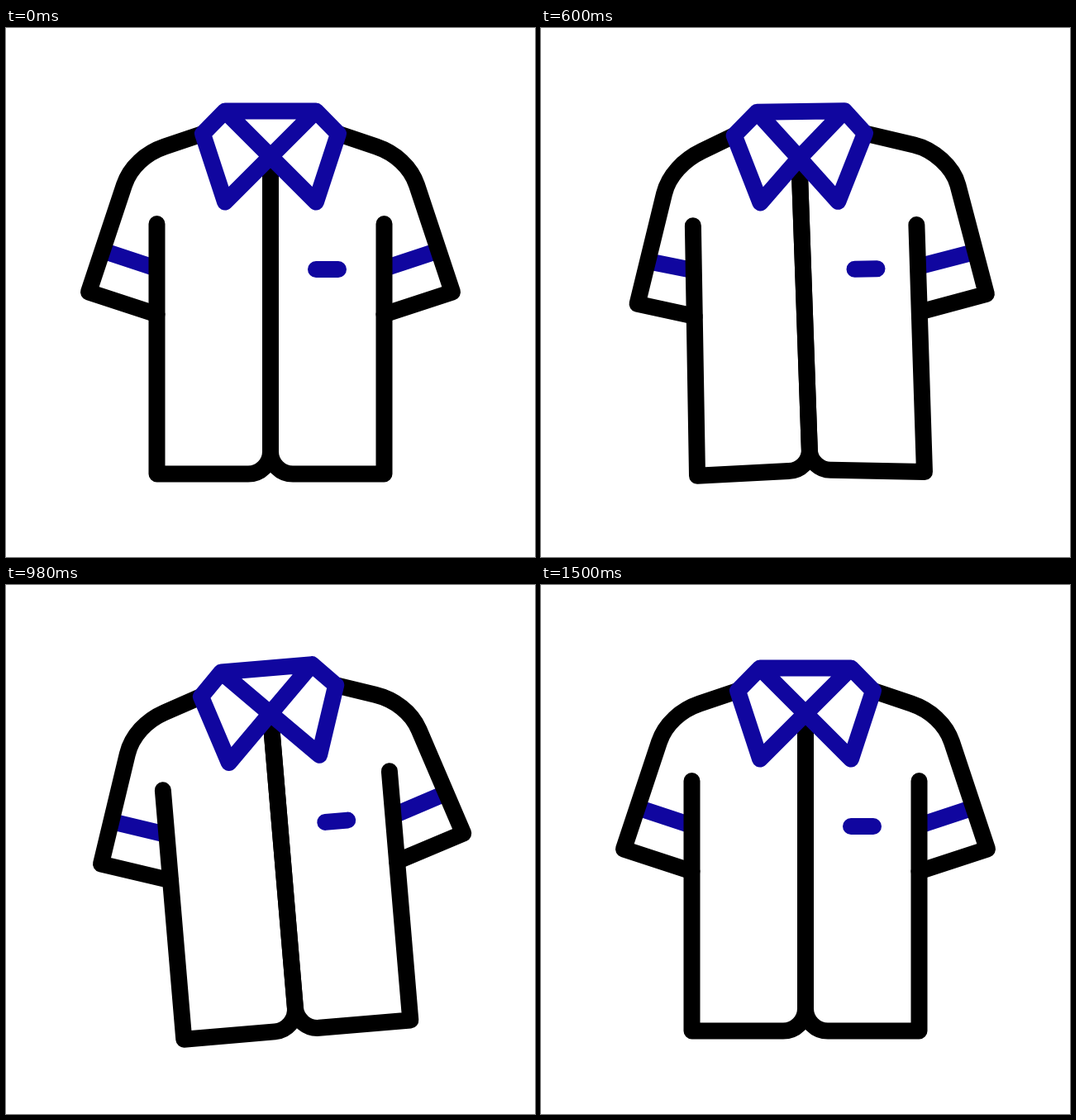
Recreate the animation shown at these times as an HTML page with a canvas. Size 640 by 640 pixels, loop 2.4 s.

```html
<!DOCTYPE html>
<html>
<head>
<meta charset="utf-8">
<style>
  html, body { margin: 0; overflow: hidden; background: #fff; }
  canvas { display: block; width: 640px; height: 640px; }
</style>
</head>
<body>
<canvas width="640" height="640"></canvas>
<script>
const ctx = document.querySelector('canvas').getContext('2d');
const LOOP = 2400, STEP = 20;
const BLACK = '#000', BLUE = '#10069f';
const PIVOT = { x: 320, y: 155.5 };

// time, angle in degrees, weight of the left-swing bend, weight of the right-swing bend
const keys = [
  [0, 0, 0, 0], [418, 20.2, 1, 0], [730, -10, 0, 1],
  [1000, 5, 0, 0], [1250, -2, 0, 0], [1500, 0, 0, 0]
];

// x, y, then the offsets for the two bends
const collar = {
  topL: [265, 100.5, 5, -1, -7, 1], topR: [375, 100.5, 2, 0, -12, 1],
  outL: [238, 128, 0, 0, -6, 1], outR: [402, 128, 0, 0, -15, 1],
  tipL: [265, 210.5, 16, 0, -10, 0], tipR: [375, 210.5, 0, 0, -26, 0],
  cross: [320, 155.5, 8.5, 1.5, -17, 2]
};
const sleeves = {
  upL: [192, 143.5, -21, 6, 16, 2], upR: [448, 143.5, -18, -3, 16, 2],
  lowL: [143, 190, -24, 9, 22, 7], lowR: [497, 190, -20, 0, 22, 5],
  cuffL: [100, 319.5, -24, 7, 35, 13], cuffR: [540, 319.5, -46, 6, 20, 6],
  hemL: [182.5, 346.5], hemR: [457.5, 346.5, 3, -4],
  bandL: [182.5, 291], bandR: [457.5, 291, 3, -3]
};
const body = {
  sideL: [182.5, 237], sideR: [457.5, 237, -12.5, 9],
  footL: [182.5, 539.5], footR: [457.5, 539.5],
  seam: [320, 512.5, 17, -1, -11.5, -3], notch: [320, 539.5, 17, -2, -11, -5],
  curveL: [293, 539.5, 18, -2, -10, -5], curveR: [347, 539.5, 13, -3, -11, -5],
  tagL: [375, 292, 6, 2], tagR: [402, 292, 6, 2]
};
const points = { ...collar, ...sleeves, ...body };

const mix = (a, b, k) => a + (b - a) * k;
const along = (p, q, k) => ({ x: mix(p.x, q.x, k), y: mix(p.y, q.y, k) });
const beyond = (p, q, length) => along(p, q, 1 + length / Math.hypot(q.x - p.x, q.y - p.y));

// cubic-bezier(.4, 0, .6, 1)
function ease(x) {
  let t = x;
  for (let i = 0; i < 5; i++) {
    t -= (1.2 * t - 0.6 * t * t + 0.4 * t ** 3 - x) / (1.2 - 1.2 * t + 1.2 * t * t);
  }
  return t * t * (3 - 2 * t);
}

function stateAt(time) {
  const i = keys.findIndex(k => k[0] > time);
  if (i < 0) return [0, 0, 0];
  const from = keys[i - 1], to = keys[i];
  const k = ease((time - from[0]) / (to[0] - from[0]));
  return [1, 2, 3].map(n => mix(from[n], to[n], k));
}

function stroke(color, cap, trace) {
  ctx.strokeStyle = color;
  ctx.lineCap = cap;
  ctx.beginPath();
  trace();
  ctx.stroke();
}

function polyline(list, close) {
  list.forEach((p, i) => i ? ctx.lineTo(p.x, p.y) : ctx.moveTo(p.x, p.y));
  if (close) ctx.closePath();
}

function drawSleeve(neck, up, low, cuff, hem, band) {
  stroke(BLUE, 'butt', () => polyline([along(low, cuff, 0.612), band]));
  stroke(BLACK, 'round', () => {
    const c1 = beyond(neck, up, 24), c2 = beyond(cuff, low, 23);
    polyline([neck, up]);
    ctx.bezierCurveTo(c1.x, c1.y, c2.x, c2.y, low.x, low.y);
    ctx.lineTo(cuff.x, cuff.y);
    ctx.lineTo(hem.x, hem.y);
  });
}

function drawPanel(side, foot, curve, p) {
  stroke(BLACK, 'round', () => {
    const c1 = along(curve, p.notch, 0.55), c2 = along(p.seam, p.notch, 0.55);
    polyline([side, foot, curve]);
    ctx.bezierCurveTo(c1.x, c1.y, c2.x, c2.y, p.seam.x, p.seam.y);
    ctx.lineTo(p.cross.x, p.cross.y);
  });
}

function draw(time) {
  const [angle, a, b] = stateAt(time);
  const p = {};
  for (const name in points) {
    const [x, y, ax = 0, ay = 0, bx = 0, by = 0] = points[name];
    p[name] = { x: x + ax * a + bx * b, y: y + ay * a + by * b };
  }

  ctx.setTransform(1, 0, 0, 1, 0, 0);
  ctx.fillStyle = '#fff';
  ctx.fillRect(0, 0, 640, 640);
  ctx.translate(PIVOT.x, PIVOT.y);
  ctx.rotate(-angle * Math.PI / 180);
  ctx.translate(-PIVOT.x, -PIVOT.y);
  ctx.lineWidth = 20;
  ctx.lineJoin = 'round';

  drawSleeve(p.outL, p.upL, p.lowL, p.cuffL, p.hemL, p.bandL);
  drawSleeve(p.outR, p.upR, p.lowR, p.cuffR, p.hemR, p.bandR);
  drawPanel(p.sideL, p.footL, p.curveL, p);
  drawPanel(p.sideR, p.footR, p.curveR, p);
  stroke(BLUE, 'round', () => {
    polyline([p.topL, p.outL, p.tipL, p.cross, p.topR], true);
    polyline([p.topR, p.outR, p.tipR, p.cross, p.topL], true);
    polyline([p.tagL, p.tagR]);
  });
}

const start = performance.now();
function tick() {
  const time = (performance.now() - start) % LOOP;
  draw(Math.floor(time / STEP) * STEP);
  requestAnimationFrame(tick);
}
tick();
</script>
</body>
</html>
```
